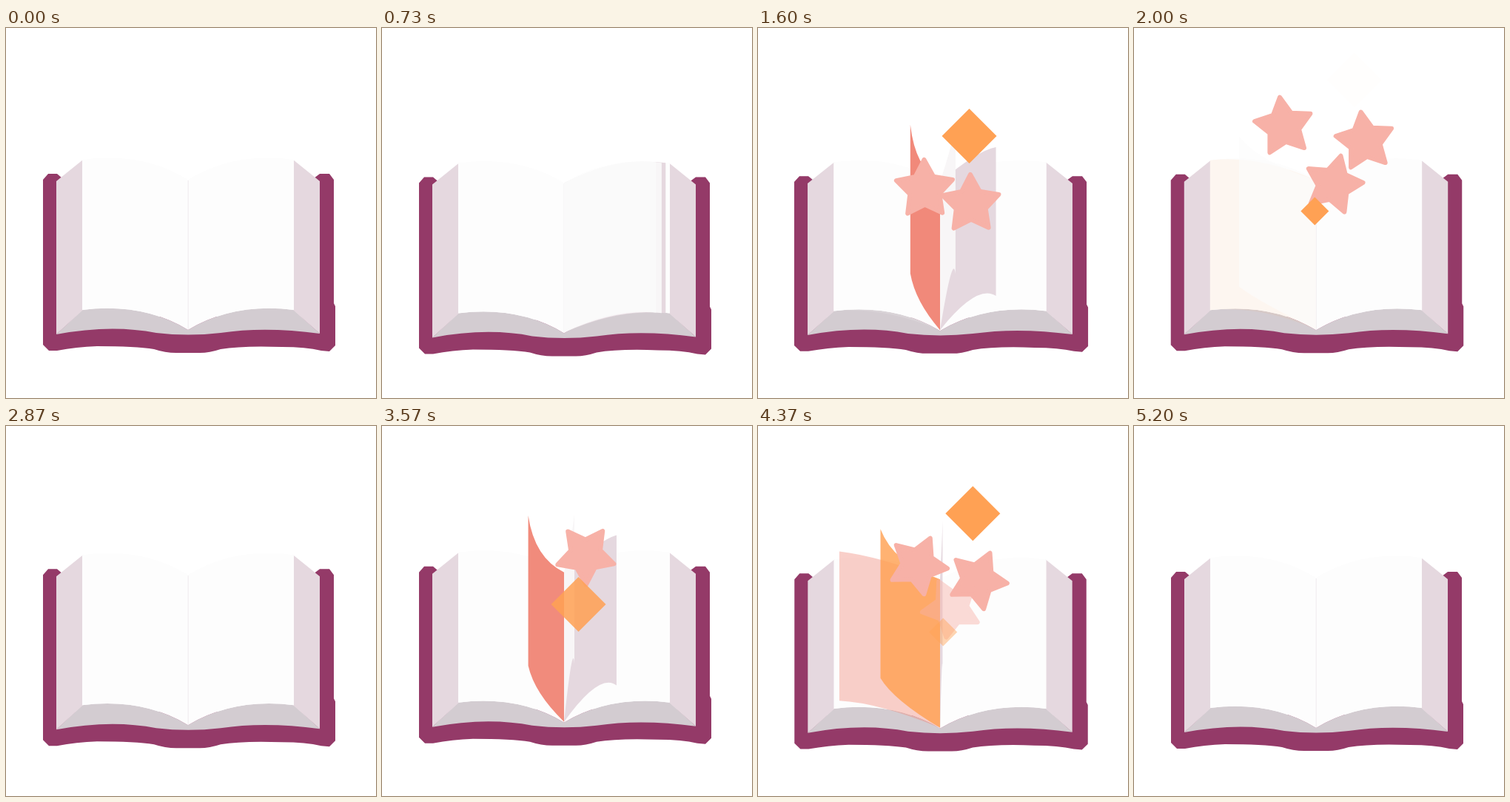
Recreate the animation shown at these times as an HTML page with a canvas. Size 500x500 px, loop 5.23 s.

```html
<!DOCTYPE html>
<html lang="en">
<head>
<meta charset="utf-8">
<title>Open book</title>
<style>
html, body { margin: 0; width: 100%; height: 100%; overflow: hidden; background: #fff; }
canvas { display: block; width: 500px; height: 500px; }
</style>
</head>
<body>
<canvas id="stage" width="500" height="500"></canvas>
<script>
const ctx = document.getElementById('stage').getContext('2d');
const CYCLE = 2615, SPINE = 246, HALF = 143;
const COVER = '#943a68', PAPER = '#fdfdfd', SIDE = '#e5d8df', EDGE = '#d3ccd1';
const SALMON = '#f1897a', ORANGE = '#ffa154', PINK = '#f7b1a7';

const clamp = v => Math.max(0, Math.min(1, v));

// Three sheets are turned together at different speeds, in two waves
const sheets = [
  { span: 505, front: '#fafafa', back: SALMON },
  { span: 657, front: '#f8f6f7', back: ORANGE },
  { span: 920, front: SIDE, back: PAPER }
];
const pages = [648, 1303].flatMap(start => sheets.map(sheet => ({ ...sheet, start })));

const star = (birth, x, y, drift, turn = -18) =>
  ({ birth, x, y, drift, turn, color: PINK, corners: 10, pull: 8e-5, outer: 40, inner: 21 });
const diamond = (birth, x, y, drift, r) =>
  ({ birth, x, y, drift, color: ORANGE, corners: 4, pull: 4e-5, outer: r, inner: r });

const bits = [
  star(740, 262, 202, .061),
  diamond(810, 261, 258, .031, 37),
  star(1165, 250, 281, -.057),
  star(1165, 261, 301, .061),
  star(1680, 259, 255, .033, 16),
  diamond(1680, 252, 287, -.024, 19)
];

// The book shakes with a damped wave, then lands and is slowly restored
function shake(t) {
  const age = t - 240;
  return age > 0 && age < 780 ? -20 * Math.exp(-age / 1100) * Math.sin(2 * Math.PI * age / 520) : 0;
}

function squash(t) {
  const q = Math.max(0, t - 1020) / 35;
  return 2 * q / (1 + q * q) * clamp((2200 - t) / 500);
}

function fill(d, color) {
  ctx.fillStyle = color;
  ctx.fill(new Path2D(d));
}

function drawBook() {
  fill('M50 205L57 197H69L76 203V390H416V203L424 197H437L443 205V372L445 376V429L437 437L426 436' +
    'Q405 431 373 431Q320 429 290 434Q275 439 262 439H230Q215 439 200 434' +
    'Q175 430 123 430Q95 431 69 436H58L50 428Z', COVER);
  fill('M103 381Q185 371 246 408Q308 371 389 381L424 413Q350 403 290 412' +
    'Q246 417 203 412Q142 400 68 414Z', EDGE);
  fill('M68 207L104 178V381L68 414ZM424 207L388 178V381L424 413Z', SIDE);
  fill('M103 178Q185 167 246 205Q308 167 389 178V381Q308 371 246 408Q185 371 103 381Z', PAPER);
  ctx.fillStyle = '#f4f1f3';
  ctx.fillRect(245.5, 206, 1.5, 201);
}

function drawPage(page, u) {
  const turned = u > .5, v = Math.min(u, 1);
  const reach = HALF * Math.cos(Math.PI * v), x = SPINE + reach;
  const k = Math.sin(Math.PI * v) ** (turned ? 1.4 : 6), lift = 54 * k;
  const bend = x - reach * (.45 - .3 * k);
  const topBend = 170 + (turned ? 17 : -20) * k;
  const lowBend = 374 - (turned ? 6 : 80) * k;
  ctx.globalAlpha = turned ? clamp((1.1 - u) / .5) : 1;
  fill(`M${x} ${178 - lift}Q${bend} ${topBend} ${SPINE} 205V407` +
    `Q${bend} ${lowBend} ${x} ${381 - lift}Z`, turned ? page.back : page.front);
  ctx.globalAlpha = 1;
}

function drawPages(t) {
  const active = pages
    .map(page => ({ page, u: (t - page.start) / page.span }))
    .filter(p => p.u > 0 && p.u < 1.1);
  const right = active.filter(p => p.u <= .5).reverse();
  const left = active.filter(p => p.u > .5);
  for (const p of [...right, ...left]) drawPage(p.page, p.u);
}

// Bits speed up as they rise and fade near the top or at the end of the cycle
function drawBit(bit, t) {
  const age = t - bit.birth;
  const x = bit.x + bit.drift * age;
  const y = bit.y - .11 * age - bit.pull * age * age;
  const alpha = clamp(age / 170) * clamp((y - 70) / 20) * clamp((2585 - t) / 120);
  if (!alpha) return;
  const isStar = bit.corners === 10;
  const turn = isStar ? bit.turn + .163 * age : 0;
  const shape = new Path2D();
  for (let i = 0; i < bit.corners; i++) {
    const angle = (turn + i * 360 / bit.corners) * Math.PI / 180;
    const r = i % 2 ? bit.inner : bit.outer;
    shape.lineTo(x + r * Math.cos(angle), y + r * Math.sin(angle));
  }
  shape.closePath();
  // The outline rounds the star's tips; mixing with white first keeps a faint star even
  ctx.globalAlpha = alpha;
  ctx.fillStyle = bit.color;
  if (isStar) drawRounded(shape, bit.color);
  else ctx.fill(shape);
  ctx.globalAlpha = 1;
}

const layer = document.createElement('canvas');
layer.width = layer.height = 500;
const soft = layer.getContext('2d');
soft.lineJoin = 'round';
soft.lineWidth = 6;

function drawRounded(shape, color) {
  soft.clearRect(0, 0, 500, 500);
  soft.fillStyle = soft.strokeStyle = color;
  soft.fill(shape);
  soft.stroke(shape);
  ctx.drawImage(layer, 0, 0);
}

function draw(now) {
  const t = now % CYCLE, s = squash(t);
  ctx.fillStyle = '#fff';
  ctx.fillRect(0, 0, 500, 500);
  ctx.save();
  ctx.translate(247, 439 + shake(t) + 7 * s);
  ctx.scale(1 + .045 * s, 1 - .08 * s);
  ctx.translate(-247, -439);
  drawBook();
  drawPages(t);
  ctx.restore();
  for (const bit of bits) drawBit(bit, t);
}

const begin = performance.now();
function loop() {
  draw(performance.now() - begin);
  requestAnimationFrame(loop);
}
loop();
</script>
</body>
</html>
```
